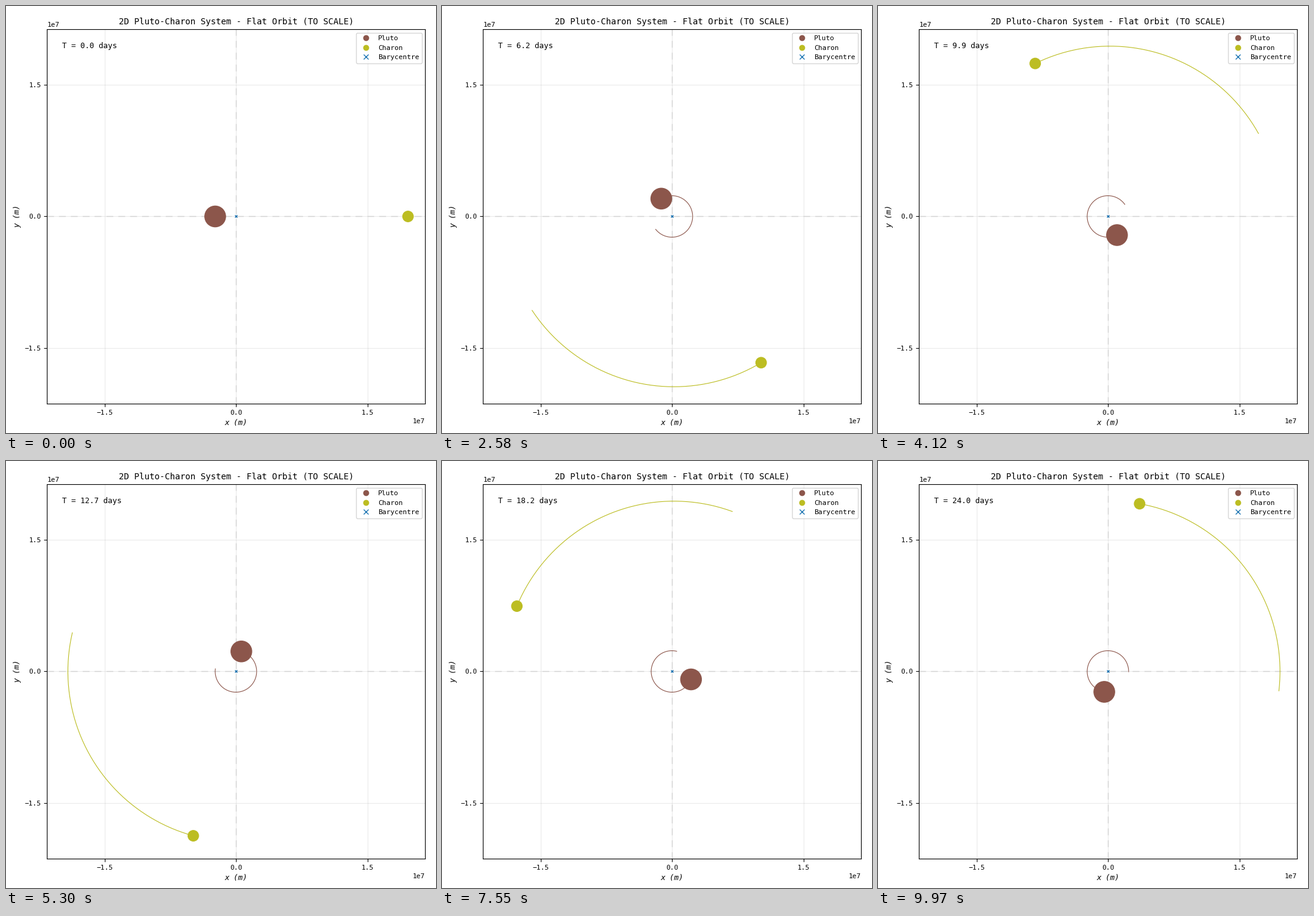
Recreate the animation shown at these times as a matplotlib script. Size 705 by 699 pixels, loop 10 s.

```python
import numpy as np
import matplotlib.pyplot as plt
from matplotlib.animation import FuncAnimation
from matplotlib.lines import Line2D
from matplotlib.patches import Circle

WIDTH, HEIGHT, DPI = 705, 699, 100
FRAMES, LOOP_MS = 330, 10000

# Two-body orbit around the barycentre, starting at the widest separation
STEPS, DAYS = 600, 24
START_R = 19.596e6
ECC = 0.0107
MASS_RATIO = 0.1218
STEP_ANGLE = np.radians(1.9375)

PLUTO = dict(color="tab:brown", radius=1.1883e6, trail=135)
CHARON = dict(color="tab:olive", radius=0.606e6, trail=45)


def orbit():
    """Positions of the lighter body at every time step (Kepler's equation)."""
    mean = np.pi + STEP_ANGLE * np.arange(STEPS)
    ecc_anom = mean.copy()
    for _ in range(6):
        ecc_anom -= (ecc_anom - ECC * np.sin(ecc_anom) - mean) / (1 - ECC * np.cos(ecc_anom))
    a = START_R / (1 + ECC)
    b = a * np.sqrt(1 - ECC**2)
    return np.column_stack([-a * (np.cos(ecc_anom) - ECC), -b * np.sin(ecc_anom)])


plt.rcParams["font.family"] = "DejaVu Sans Mono"
fig = plt.figure(figsize=(WIDTH / DPI, HEIGHT / DPI), dpi=DPI, facecolor="white")

left, right, top, bottom = 67.3, 687.3, 38.0, 651.0
ax = fig.add_axes([left / WIDTH, 1 - bottom / HEIGHT,
                   (right - left) / WIDTH, (bottom - top) / HEIGHT])
ax.set_xlim(-21.556e6, 21.556e6)
ax.set_ylim(-21.315e6, 21.315e6)
ticks = [-1.5e7, 0, 1.5e7]
ax.set_xticks(ticks)
ax.set_yticks(ticks)
ax.tick_params(labelsize=8)
for axis in (ax.xaxis, ax.yaxis):
    axis.get_offset_text().set_fontsize(8)
ax.set_axisbelow(True)
ax.grid(alpha=0.25)
ax.set_title("2D Pluto-Charon System - Flat Orbit (TO SCALE)", fontsize=10)
ax.set_xlabel("x (m)", fontsize=9, style="italic")
ax.set_ylabel("y (m)", fontsize=9, style="italic")

dashes = dict(color="lightgrey", lw=1, ls=(0, (8, 6)), zorder=1)
ax.axhline(0, **dashes)
ax.axvline(0, **dashes)
ax.plot(0, 0, "x", color="tab:blue", ms=3.5, mew=1, zorder=5)

clock = ax.text(0.04, 0.95, "", fontsize=9, transform=ax.transAxes)


def handle(label, color, marker="o"):
    return Line2D([], [], ls="", marker=marker, color=color, ms=6, label=label)


ax.legend(handles=[handle("Pluto", PLUTO["color"]),
                   handle("Charon", CHARON["color"]),
                   handle("Barycentre", "tab:blue", "x")],
          loc="upper right", fontsize=8)

CHARON["path"] = orbit()
PLUTO["path"] = -MASS_RATIO * CHARON["path"]
for body in (PLUTO, CHARON):
    body["line"], = ax.plot([], [], color=body["color"], lw=0.8, zorder=3)
    body["disc"] = ax.add_patch(Circle((0, 0), body["radius"], fc=body["color"],
                                       ec=body["color"], lw=1, zorder=4))


def draw(frame):
    # 60 simulation steps per second shown at 33 frames per second
    step = (20 * frame + 20) // 11 - 1
    for body in (PLUTO, CHARON):
        path = body["path"]
        body["line"].set_data(*path[max(0, step - body["trail"]):step + 1].T)
        body["disc"].center = path[step]
    clock.set_text(f"T = {DAYS * step / (STEPS - 1):.1f} days")
    return PLUTO["line"], PLUTO["disc"], CHARON["line"], CHARON["disc"], clock


anim = FuncAnimation(fig, draw, frames=FRAMES, interval=LOOP_MS / FRAMES,
                     repeat=True, repeat_delay=0)
plt.show()
```
